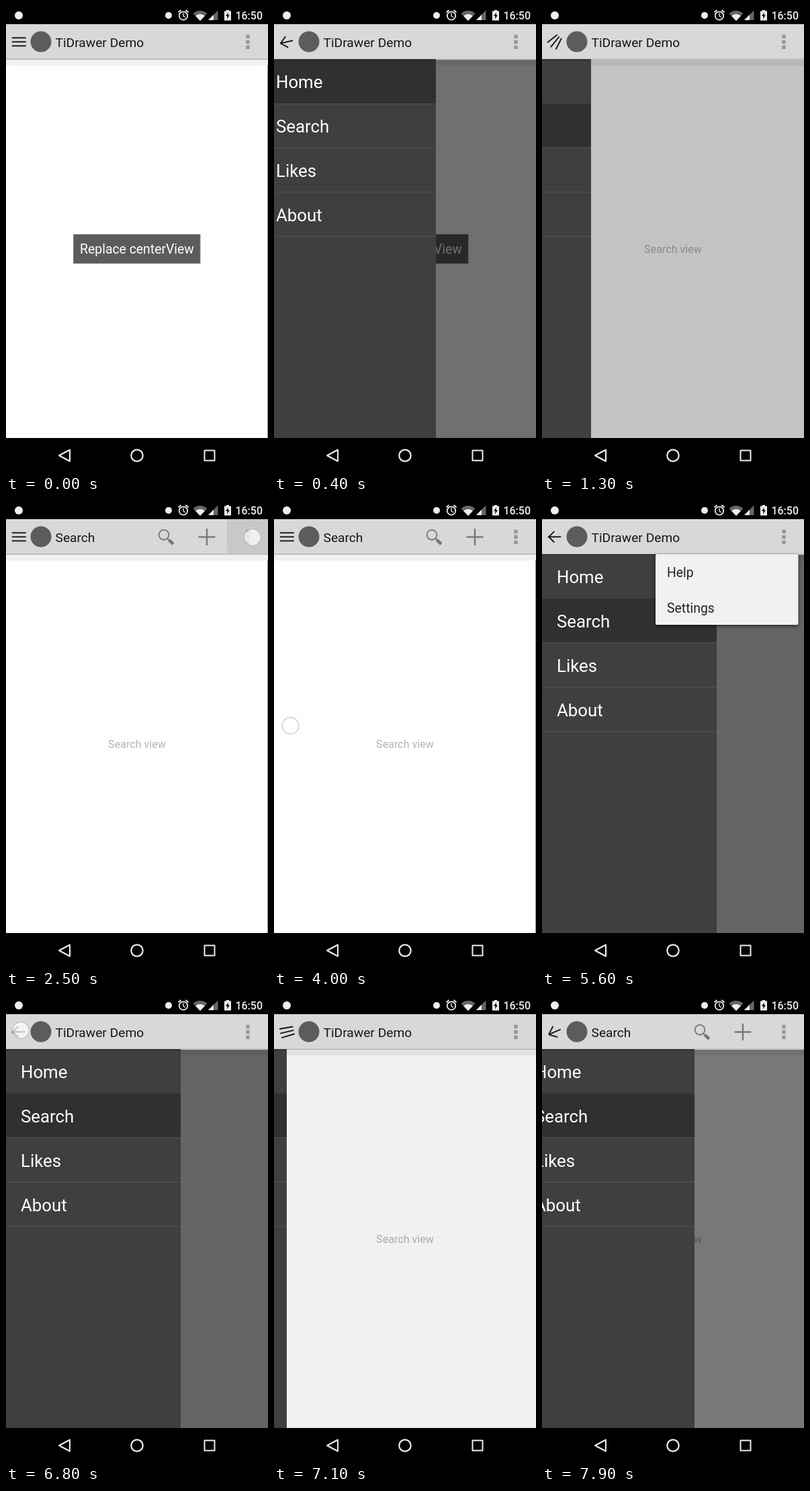
An HTML page with a canvas that plays this animation: 390 by 694 pixels, repeating every 8000 ms.

```html
<!DOCTYPE html>
<html lang="en">
<head>
<meta charset="utf-8">
<title>Drawer demo</title>
<style>
html, body { margin: 0; width: 100%; height: 100%; overflow: hidden; background: #000; }
canvas { display: block; width: 390px; height: 694px; }
</style>
</head>
<body>
<canvas id="stage"></canvas>
<script>
const W = 390, H = 694, LOOP = 8000, STEP = 100;
const BAR_TOP = 27, BAR_BOTTOM = 80, NAV_TOP = 642, DRAWER = 260;
const ROWS = ['Home', 'Search', 'Likes', 'About'];

const canvas = document.getElementById('stage');
const ctx = canvas.getContext('2d');
const ratio = window.devicePixelRatio || 1;
canvas.width = W * ratio;
canvas.height = H * ratio;

// Finger contacts: from, to, x, y
const TOUCHES = [
  [100, 200, 20, 52],
  [900, 1200, 100, 178],
  [2500, 2700, 367, 54],
  [3400, 3500, 376, 57],
  [5200, 5400, 361, 53],
  [6100, 6300, 330, 24],
  [6700, 6900, 22, 51],
  [7700, 7800, 22, 51]
];

// Popup menu: fade in from, to, fade out from, to
const POPUPS = [[2640, 2860, 3430, 3580], [5340, 5560, 6240, 6390]];

// Scrim darkness against how far the drawer is open
const SCRIM = [[0, 0], [.073, .055], [.28, .235], [.873, .53], [1, .605]];

const clamp = v => Math.max(0, Math.min(1, v));
const lerp = (a, b, p) => a + (b - a) * p;
const ramp = (t, a, b) => clamp((t - a) / (b - a));
const settle = (t, start) => 1 - (1 - ramp(t, start, start + 512)) ** 5;
const within = (t, a, b) => t >= a && t < b;

function rect(x, y, w, h, color) {
  ctx.fillStyle = color;
  ctx.fillRect(x, y, w, h);
}

function disc(x, y, r, color) {
  ctx.beginPath();
  ctx.arc(x, y, r, 0, Math.PI * 2);
  ctx.fillStyle = color;
  ctx.fill();
}

function ring(x, y, r, color, width) {
  ctx.beginPath();
  ctx.arc(x, y, r, 0, Math.PI * 2);
  ctx.strokeStyle = color;
  ctx.lineWidth = width;
  ctx.stroke();
}

function line(color, width, ...points) {
  ctx.beginPath();
  points.forEach(([x, y]) => ctx.lineTo(x, y));
  ctx.strokeStyle = color;
  ctx.lineWidth = width;
  ctx.stroke();
}

function polygon(color, ...points) {
  ctx.beginPath();
  points.forEach(([x, y]) => ctx.lineTo(x, y));
  ctx.closePath();
  ctx.fillStyle = color;
  ctx.fill();
}

function text(str, x, y, size, color, align = 'left', weight = 400) {
  ctx.font = `${weight} ${size}px Roboto, sans-serif`;
  ctx.textAlign = align;
  ctx.fillStyle = color;
  ctx.fillText(str, x, y);
}

function openness(t) {
  if (t < 1185) return settle(t, 190);
  if (t < 4000) return 1 - settle(t, 1185);
  if (t < 4200) return (t - 4000) / 100 * .36;
  if (t < 6700) return lerp(.75, 1, settle(t, 4200));
  if (t < 7700) return 1 - settle(t, 6890);
  return settle(t, 7727);
}

function scrimAlpha(p) {
  const i = Math.max(1, SCRIM.findIndex(s => s[0] >= p));
  const [p0, a0] = SCRIM[i - 1], [p1, a1] = SCRIM[i];
  return lerp(a0, a1, (p - p0) / (p1 - p0));
}

function drawStatusBar() {
  rect(0, 0, W, BAR_TOP, '#000');
  disc(19, 14, 6, '#eee');
  disc(242, 14, 5, '#eee');

  ring(264, 14.5, 6.2, '#eee', 1.8);
  line('#eee', 1.4, [264, 10.5], [264, 15], [267, 17]);
  line('#eee', 1.8, [256.5, 9.5], [260.5, 6]);
  line('#eee', 1.8, [271.5, 9.5], [267.5, 6]);

  for (const [r, color] of [[15, '#666'], [10, '#eee']]) {
    ctx.beginPath();
    ctx.moveTo(289, 22);
    ctx.arc(289, 22, r, -Math.PI * .745, -Math.PI * .255);
    ctx.fillStyle = color;
    ctx.fill();
  }
  polygon('#666', [301, 21], [315.5, 21], [315.5, 6.5]);
  polygon('#eee', [301, 21], [309, 21], [309, 13]);

  rect(325, 7.5, 10, 14, '#eee');
  rect(328, 6, 4, 2, '#eee');
  polygon('#000', [331, 9.5], [327, 15], [329.5, 15], [329, 19.5], [333, 13.5], [330.5, 13.5]);
  text('16:50', 382, 20, 16, '#eee', 'right', 500);
}

function drawNavBar() {
  rect(0, NAV_TOP, W, H - NAV_TOP, '#000');
  ctx.lineJoin = 'round';
  line('#eee', 2, [95, 659.5], [79, 668], [95, 676.5], [95, 659.5], [79, 668]);
  ring(195, 668, 8.7, '#eee', 2.2);
  ctx.strokeStyle = '#eee';
  ctx.lineWidth = 2;
  ctx.strokeRect(295.5, 660.5, 15, 15);
  ctx.lineJoin = 'miter';
}

function drawToggle(p, mirrored) {
  const size = lerp(21, 12.7, p), shaft = lerp(21, 20, p);
  const angle = lerp(0, Math.PI / 4, p);
  const offset = lerp(6, -.8, p), cut = lerp(0, 1, p);
  const dx = size * Math.cos(angle), dy = size * Math.sin(angle);
  const left = -shaft / 2;
  ctx.save();
  ctx.translate(19.3, 53.3);
  ctx.rotate((p - 1) * Math.PI * (mirrored ? -1 : 1));
  line('#161616', 1.9, [left + cut, 0], [-left - cut, 0]);
  line('#161616', 1.9, [left, offset], [left + dx, offset + dy]);
  line('#161616', 1.9, [left, -offset], [left + dx, -offset - dy]);
  ctx.restore();
}

function drawActionBar(t, p) {
  const onSearch = within(t, 1700, 4600) || t >= 7400;
  const mirrored = within(t, 600, 1700) || within(t, 4600, 7400);
  rect(0, BAR_TOP, W, BAR_BOTTOM - BAR_TOP, '#dad7da');
  if (within(t, 2500, 2800)) rect(329, BAR_TOP, 61, 51, '#cac7ca');
  rect(0, 78, W, 2, '#c1bec1');

  drawToggle(p, mirrored);
  disc(52, 53, 15.5, '#5c5c5e');
  text(onSearch ? 'Search' : 'TiDrawer Demo', 73.5, 60.5, 19.2, '#161616');

  if (onSearch) {
    ring(235, 50.3, 7.4, '#777', 1.9);
    line('#777', 2, [240, 55.5], [243, 58.5]);
    line('#777', 4.5, [242.5, 58], [249, 64]);
    line('#777', 2.4, [286.5, 53.5], [311.5, 53.5]);
    line('#777', 2.4, [299, 41], [299, 66]);
  }
  for (let i = 0; i < 3; i++) rect(357.3, 42.7 + i * 8, 5.4, 5.4, '#999799');
}

function drawCenter(t, p) {
  rect(0, BAR_BOTTOM, W, NAV_TOP - BAR_BOTTOM, '#fff');
  rect(0, BAR_BOTTOM, W, 8.5, '#f1eff1');
  if (t < 1200) {
    rect(100, 339, 189.5, 44, '#858587');
    rect(101, 340, 187.5, 42, '#5c5c5f');
    text('Replace centerView', 195, 368, 19.4, '#fff', 'center');
  } else {
    text('Search view', 195, 367, 16.1, '#b4b4b6', 'center');
  }
  if (p > 0) rect(0, BAR_BOTTOM, W, NAV_TOP - BAR_BOTTOM, `rgba(0,0,0,${scrimAlpha(p)})`);
  else rect(389, 88, 1, NAV_TOP - 88, '#858587');
}

function drawDrawer(t, width) {
  if (width <= 0) return;
  const selected = t < 1000 ? 0 : 1;
  ctx.save();
  ctx.translate(width - DRAWER, 0);
  rect(0, 79, DRAWER, NAV_TOP - 79, '#3f3f3f');
  ROWS.forEach((label, i) => {
    const top = 79.5 + i * 65.8;
    if (i === selected) rect(0, Math.round(top), DRAWER, 65, '#303030');
    rect(0, Math.round(top + 65), DRAWER, 1, '#525252');
    text(label, 22, top + 42.7, 25.8, '#fff');
  });
  rect(0, 79, DRAWER, 1.5, '#2b2b2b');
  ctx.restore();
}

function drawPopup(t) {
  for (const [inFrom, inTo, outFrom, outTo] of POPUPS) {
    const shown = ramp(t, inFrom, inTo), alpha = shown * (1 - ramp(t, outFrom, outTo));
    if (alpha <= 0) continue;
    const scale = lerp(.9, 1, shown);
    ctx.save();
    ctx.globalAlpha = alpha;
    ctx.translate(381, 79);
    ctx.scale(scale, scale);
    ctx.translate(-381, -79);
    ctx.save();
    ctx.shadowColor = 'rgba(0,0,0,.6)';
    ctx.shadowBlur = 5 * ratio;
    ctx.shadowOffsetY = 2 * ratio;
    ctx.beginPath();
    ctx.roundRect(169, 79, 212.5, 105, 2);
    ctx.fillStyle = '#f2f0f3';
    ctx.fill();
    ctx.restore();
    text('Help', 186, 112.5, 19.4, '#222');
    text('Settings', 186, 165.5, 19.4, '#222');
    ctx.restore();
  }
}

function drawFinger(x, y) {
  disc(x, y, 12.5, 'rgba(255,255,255,.72)');
  ring(x, y, 12.3, 'rgba(150,150,150,.55)', 1.2);
}

function drawTouches(t, width) {
  for (const [from, to, x, y] of TOUCHES) {
    if (within(t, from, to)) drawFinger(x, y);
  }
  if (within(t, 4000, 4300)) drawFinger(24.5 + width, 334);
}

function render(t) {
  const p = openness(t), width = Math.round(p * DRAWER);
  const shown = width / DRAWER;
  ctx.setTransform(ratio, 0, 0, ratio, 0, 0);
  drawCenter(t, shown);
  drawActionBar(t, shown);
  drawDrawer(t, width);
  drawStatusBar();
  drawPopup(t);
  drawTouches(t, width);
  drawNavBar();
}

const start = performance.now();
function tick() {
  const t = (performance.now() - start) % LOOP;
  render(Math.floor(t / STEP) * STEP);
  requestAnimationFrame(tick);
}
tick();
</script>
</body>
</html>
```
